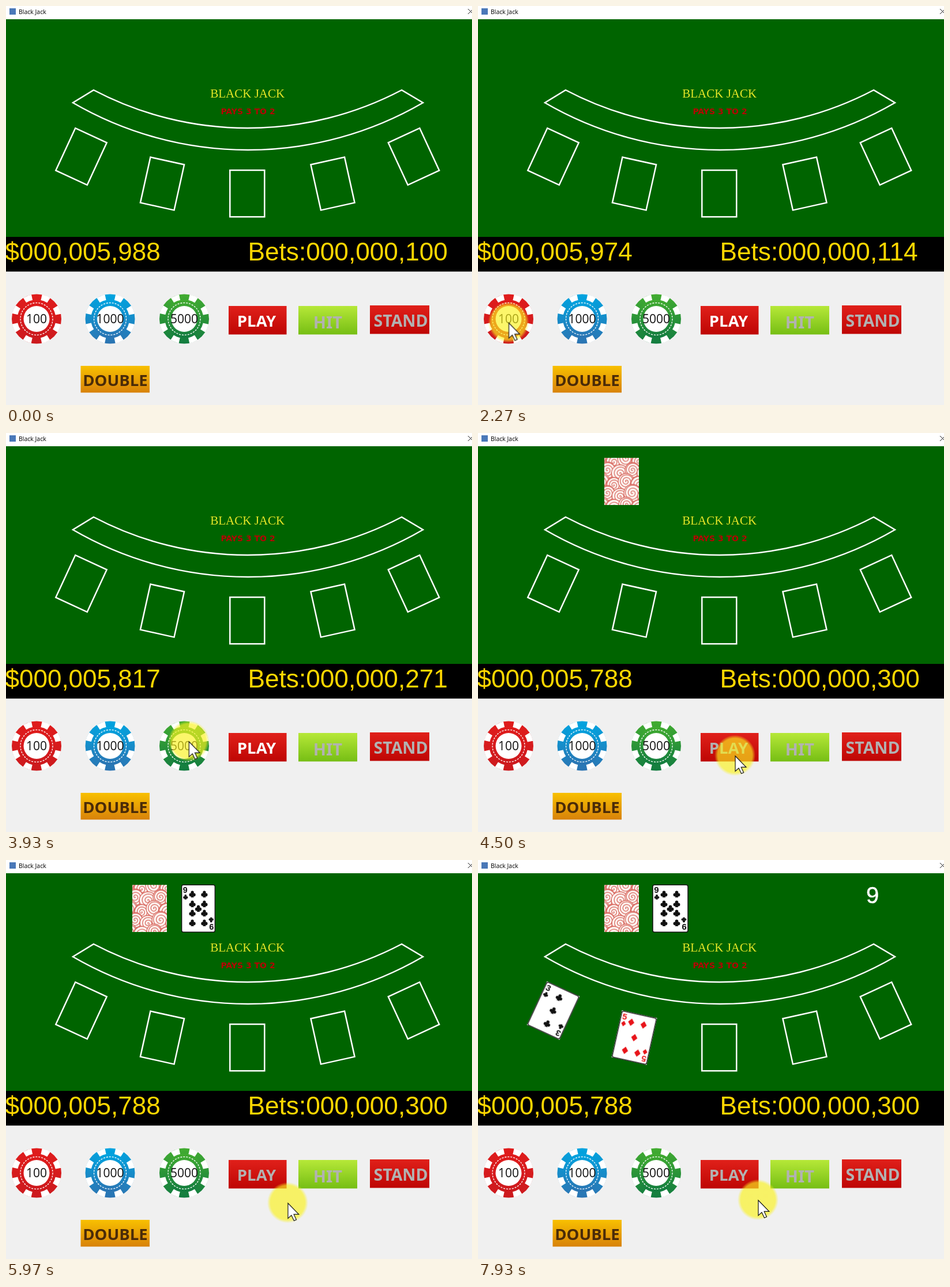
Recreate the animation shown at these times as an HTML page. Size 808 px wide and 693 px high, loop 8000 ms.

```html
<!DOCTYPE html>
<html lang="en">
<head>
<meta charset="utf-8">
<title>Black Jack</title>
<style>
  html, body { margin: 0; width: 100%; height: 100%; overflow: hidden; background: #f0f0f0; }
  svg { display: block; width: 808px; height: 693px; }
  .mid { text-anchor: middle; }
  .line { fill: none; stroke: #fff; stroke-width: 2.5; }
  .money { font: 44px "Liberation Sans", Arial, sans-serif; fill: #ffd700; }
  .chip { font: 21px "Open Sans", "Noto Sans", sans-serif; fill: #111; text-anchor: middle; }
  .btn { font: bold 27.5px "Noto Sans", "Open Sans", sans-serif; text-anchor: middle; fill: #b2b2b2; }
  .index { font: bold 15px "Liberation Sans", Arial, sans-serif; text-anchor: middle; }
  #play { animation: play 8s infinite step-end; }
  #score { animation: score 8s infinite step-end;
    font: 40px "Liberation Sans", Arial, sans-serif; fill: #fff; stroke: #fff; stroke-width: .5; }
  @keyframes play { 0% { fill: #fff } 55% { fill: #b2b2b2 } }
  @keyframes score { 0% { visibility: hidden } 99.1% { visibility: visible } 100% { visibility: visible } }
</style>
</head>
<body>
<svg viewBox="0 0 808 693">
  <defs>
    <linearGradient id="red" x2="0" y2="1"><stop stop-color="#e0201a"/><stop offset="1" stop-color="#be0604"/></linearGradient>
    <linearGradient id="lime" x2="0" y2="1"><stop stop-color="#b6e838"/><stop offset="1" stop-color="#76be14"/></linearGradient>
    <linearGradient id="amber" x2="0" y2="1"><stop stop-color="#f8c000"/><stop offset="1" stop-color="#d8820a"/></linearGradient>
    <linearGradient id="c100" x2="0" y2="1"><stop stop-color="#e01c1c"/><stop offset="1" stop-color="#cc1a1e"/></linearGradient>
    <linearGradient id="c1000" x2="0" y2="1"><stop stop-color="#00a4e0"/><stop offset="1" stop-color="#2c74b2"/></linearGradient>
    <linearGradient id="c5000" x2="0" y2="1"><stop stop-color="#42ac30"/><stop offset="1" stop-color="#127c40"/></linearGradient>
    <radialGradient id="glow">
      <stop offset=".84" stop-color="#faf21e" stop-opacity=".66"/>
      <stop offset="1" stop-color="#faf21e" stop-opacity="0"/>
    </radialGradient>
    <clipPath id="edge"><rect x="-30" y="-40.5" width="60" height="81"/></clipPath>
    <g id="club">
      <circle cy="-2.9" r="2.8"/><circle cx="-3.1" cy="1.2" r="2.8"/><circle cx="3.1" cy="1.2" r="2.8"/>
      <path d="M-.9-2h1.800l.4 4.500 1.600 3.300h-5.800l1.600-3.300z"/>
    </g>
    <path id="diamond" d="M0-6.500 5.500 0 0 6.500-5.500 0z"/>
  </defs>

  <rect width="808" height="23" fill="#fff"/>
  <rect x="6" y="4" width="11" height="11" fill="#4a78b8"/>
  <text x="22" y="13.5" style="font:10.5px 'Open Sans','Noto Sans',sans-serif">Black Jack</text>
  <path d="M801 5l9 9m0-9l-9 9" stroke="#222" fill="none"/>

  <rect y="23" width="808" height="378" fill="#006400"/>
  <path class="line" d="M152 146A573 573 0 0 0 686 146L723 168A603 603 0 0 1 116 168Z"/>
  <text class="mid" x="418.700" y="159" fill="#e8e628" style="font:21px 'Liberation Serif',Times,serif">BLACK JACK</text>
  <text class="mid" x="419.500" y="188" fill="#b40404" style="font:bold 14px 'DejaVu Sans',sans-serif">PAYS 3 TO 2</text>
  <g id="spots"></g>
  <g id="cards"></g>
  <text id="score" class="mid" x="684" y="75">9</text>

  <rect y="401" width="808" height="60.500" fill="#000"/>
  <text id="cash" class="money" x="-1.500" y="442"></text>
  <text id="bets" class="money" x="419.500" y="442" style="font-size:44.200px"></text>

  <rect y="461.500" width="808" height="231.500" fill="#f0f0f0"/>
  <g id="chips"></g>
  <rect x="386" y="521" width="100.500" height="49.500" fill="url(#red)"/>
  <text id="play" class="btn" x="434.500" y="556.500">PLAY</text>
  <rect x="507" y="521" width="102" height="49.500" fill="url(#lime)"/>
  <text class="btn" x="558" y="559.500" style="font-size:29px">HIT</text>
  <rect x="631" y="520" width="103" height="49.500" fill="url(#red)"/>
  <text class="btn" x="684.500" y="556.500" style="font-size:28.500px">STAND</text>
  <rect x="129.500" y="625" width="119.500" height="46.500" fill="url(#amber)"/>
  <text class="btn" x="189.500" y="660" style="fill:#4a2b08">DOUBLE</text>

  <g id="cursor">
    <circle cx="-.5" cy="-1" r="35.500" fill="url(#glow)"/>
    <path d="M0 0V26.500L6 21 10.500 30.500 14.500 28.700 10.200 19.400H18.800Z" fill="#fff" stroke="#111" stroke-width="1.200"/>
  </g>
</svg>

<script>
const LOOP = 8000;
const $ = id => document.getElementById(id);
const pct = ms => (ms / LOOP * 100).toFixed(3) + '%';
const css = [];

// Table spots: centre x, centre y, tilt
const spots = [[130.5, 261.5, 24.8], [271, 308.6, 12.5], [418.3, 325.7, 0], [566.5, 308.6, -12.5], [707, 261.5, -24.8]];
const place = ([x, y, a]) => `transform="translate(${x} ${y}) rotate(${a})"`;
$('spots').innerHTML = spots.map(s =>
  `<rect class="line" x="-30" y="-40.5" width="60" height="81" ${place(s)}/>`).join('');

// Chips
function chip(x, value) {
  const fill = `url(#c${value})`;
  const pitch = 2 * Math.PI * 38 / 8;
  return `<g transform="translate(${x} 543.5)">
    <circle r="43" fill="${fill}"/>
    <circle r="38" fill="none" stroke="#fff" stroke-width="10.5" stroke-dasharray="${pitch * .45} ${pitch * .55}" transform="rotate(12.4)"/>
    <circle r="33.5" fill="${fill}"/>
    <circle r="28" fill="none" stroke="#fff" stroke-width="1.3" stroke-dasharray="3 2"/>
    <circle r="22.5" fill="#fff"/>
    <text class="chip" y="7.500">${value}</text></g>`;
}
$('chips').innerHTML = chip(53, 100) + chip(180.5, 1000) + chip(309, 5000);

// Card back: overlapping spirals
function spiral(x, y, r) {
  let d = '';
  for (let i = 0; i <= 64; i++) {
    const k = i / 64, a = k * 6 * Math.PI + x;
    d += `${i ? 'L' : 'M'}${(x + r * k * Math.cos(a)).toFixed(1)} ${(y + r * k * Math.sin(a)).toFixed(1)}`;
  }
  return `<circle cx="${x}" cy="${y}" r="${r}" fill="#fdf6f2"/><path d="${d}" fill="none"/>`;
}
function back() {
  let s = '';
  for (let row = 0; row < 5; row++)
    for (let col = 0; col < 4; col++)
      s += spiral(col * 22 - 36 + row % 2 * 11, row * 20 - 40 + col % 2 * 6, 13 + (row + col) % 3);
  return `<g clip-path="url(#edge)" stroke="#d8685f" stroke-width="1.3">
    <rect x="-30" y="-40.5" width="60" height="81" fill="#fff" stroke="none"/>${s}</g>`;
}

// Card face: index in two corners, pips in the middle
function face(rank, suit, color, pips) {
  const corner = `<text class="index" x="-24" y="-27">${rank}</text>
    <use href="#${suit}" transform="translate(-23.500 -20) scale(.75)"/>`;
  return `<rect x="-30.500" y="-41" width="61" height="82" rx="3" fill="#fff" stroke="#111" stroke-width="1.500"/>
    <g fill="${color}">${corner}<g transform="rotate(180)">${corner}</g>
    ${pips.map(([x, y]) => `<use href="#${suit}" x="${x}" y="${y}"/>`).join('')}</g>`;
}

const corners = [[-11, -25], [11, -25], [-11, 25], [11, 25], [0, 0]];
const nine = [...corners, [-11, -8], [11, -8], [-11, 8], [11, 8]];
const deals = [
  { at: [249, 84.2, 0], start: 4460, front: back() },
  { at: [333.5, 84.2, 0], start: 5330, front: face(9, 'club', '#111', nine) },
  { at: spots[0], start: 6200, front: face(3, 'club', '#111', [[0, -25], [0, 0], [0, 25]]) },
  { at: spots[1], start: 7070, front: face(5, 'diamond', '#e8141a', corners) }
];
const FLIP = 720;
const hide = 'transform:scaleX(0)', show = 'transform:scaleX(1)';
$('cards').innerHTML = deals.map(({ at, start, front }, i) => {
  const mid = pct(start + FLIP / 2);
  css.push(`@keyframes back${i} {
    0% { ${hide}; animation-timing-function: step-end }
    ${pct(start)} { ${show}; animation-timing-function: cubic-bezier(.364,0,.636,.428) }
    ${mid}, 100% { ${hide} } }
  @keyframes front${i} {
    0% { ${hide} }
    ${mid} { ${hide}; animation-timing-function: cubic-bezier(.364,.572,.636,1) }
    ${pct(start + FLIP)}, 100% { ${show} } }`);
  return `<g ${place(at)}>
    <g style="animation:back${i} 8s infinite linear">${back()}</g>
    <g style="animation:front${i} 8s infinite linear">${front}</g></g>`;
}).join('');

// Pointer path: time, x, y
const path = [
  [0, 860, 390], [1000, 860, 390], [1030, 836, 401], [1230, 640, 520], [1430, 490, 735], [1590, 540, 735],
  [1600, 532, 681], [1810, 260, 602], [2030, 42, 554], [2140, 53, 550], [2430, 54, 551],
  [2930, 56, 577], [3230, 56, 577], [3360, 56, 562], [3520, 62, 556], [3930, 317, 536],
  [4330, 435, 548], [4870, 470, 589], [5300, 480, 596], [5800, 490, 598], [6400, 486, 591], [LOOP, 486, 591]
];
css.push(`@keyframes point { ${path.map(([t, x, y]) => `${pct(t)} { transform: translate(${x}px, ${y}px) }`).join(' ')} }
  #cursor { animation: point 8s infinite linear }`);

const sheet = document.createElement('style');
sheet.textContent = css.join('\n');
document.head.append(sheet);

// Counters: each click on the 100 chip moves 100 from cash to bets
const TOTAL = 6088, RATE = 0.13, clicks = [2162, 3380];
const money = n => String(n).padStart(9, '0').replace(/(?=(...)+$)(?!^)/g, ',');
function draw(t) {
  const bet = clicks.reduce((sum, c) => sum + Math.min(100, Math.max(0, Math.floor((t - c) * RATE))), 100);
  $('cash').textContent = '$' + money(TOTAL - bet);
  $('bets').textContent = 'Bets:' + money(bet);
}
let origin;
function tick(now) {
  origin ??= now;
  draw((now - origin) % LOOP);
  requestAnimationFrame(tick);
}
draw(0);
requestAnimationFrame(tick);
</script>
</body>
</html>
```
